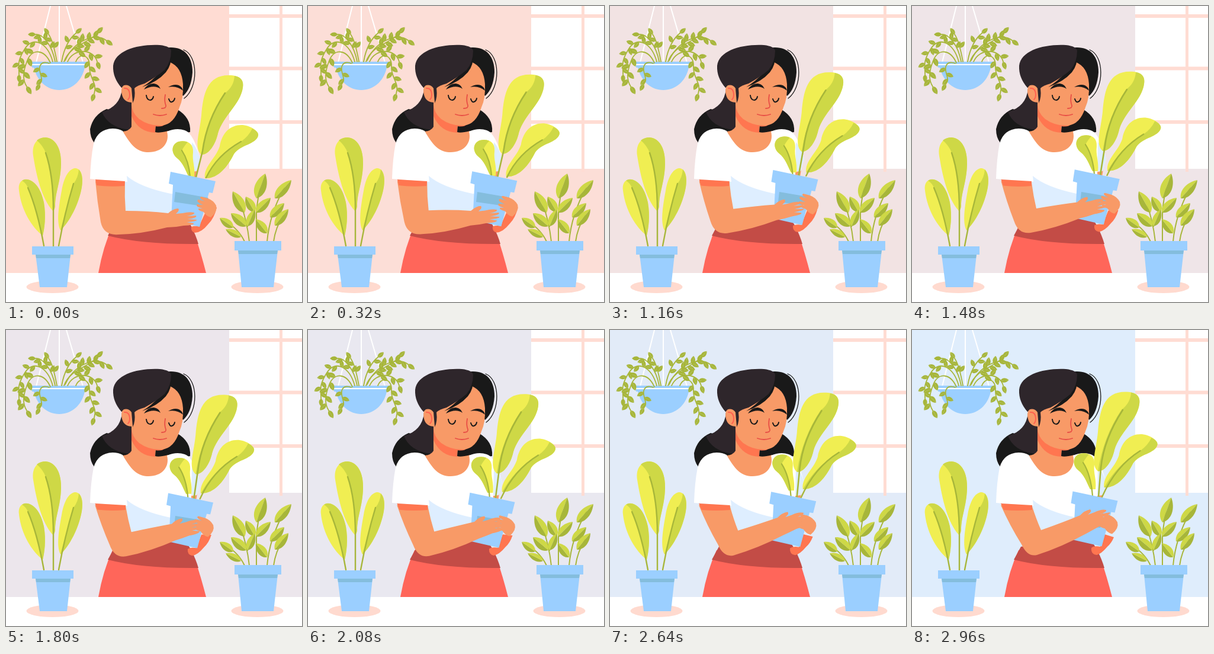
Recreate the animation shown at these times as an HTML page. Size 500 by 500 pixels, loop 3000 ms.

```html
<!DOCTYPE html>
<html lang="en">
<head>
<meta charset="utf-8">
<title>Woman with plants</title>
<style>
html, body { margin: 0; width: 100%; height: 100%; overflow: hidden; background: #fff; }
svg { display: block; width: 100vw; height: 100vh; }
.line { fill: none; stroke-linecap: round; stroke-linejoin: round; }
</style>
</head>
<body>
<svg id="stage" viewBox="0 0 500 500">
  <rect id="wall" width="500" height="451"/>
  <path fill="#fff" d="M377 0H500V275H377ZM0 451H500V500H0Z"/>
  <path fill="#ffdcd3" d="M377 14H500V20H377ZM377 102.500H500V108.500H377ZM377 193H500V199H377ZM462 0H467V280H462Z"/>

  <path class="line" stroke="#fff" stroke-width="2" d="M75 0L51 95M90 0V95M102 0L130 95"/>
  <path fill="#9bcfff" d="M42 94H138L135 104H133C128 128 110 142 90 142S53 128 47 104H44Z"/>
  <path stroke="#fff" stroke-width="2" d="M43 99H137"/>
  <g id="vines"></g>

  <g fill="#ffdacf"><ellipse cx="78.500" cy="474.500" rx="44" ry="10.500"/><ellipse cx="424.500" cy="474.500" rx="44" ry="10.500"/></g>
  <g id="tall"></g>
  <g id="bush"></g>
  <g fill="#9bcfff">
    <path d="M44 406H114V420H109L103 475H57L50 420H44Z"/>
    <path d="M386 397H465V413H459L452 475H398L392 413H386Z"/>
  </g>
  <path fill="#84bddd" d="M50 420H109L108 426H51ZM392 413H459L458 419H393Z"/>

  <!-- back hair and neck -->
  <path fill="#191919" d="M170 174Q147 184 142 208Q142 222 149 231L165 212L212 214L212 185ZM288 174Q313 188 311 213L285 216L245 214L252 190Z"/>
  <path fill="#2e262b" d="M196 140Q193 170 162 179Q172 204 206 209L216 206L214 160Z"/>
  <path fill="#f89a67" d="M212 165V204Q208 211 197 212Q212 249 240 248Q276 248 274 211Q258 215 252 213L254 190Z"/>
  <path fill="#ff7650" d="M212 168Q230 195 268 200Q264 205 252 203V214Q224 213 212 186Z"/>

  <!-- shirt, trousers -->
  <path fill="#f89a67" d="M313 276H323L320 295H312Z"/>
  <path fill="#fff" d="M197 211C213 240 225 247 241 247C263 247 277 232 272 212Q288 205 302 210Q317 215 328 258L322 279L313 280L312 372H186L192 296L142 292Q143 258 148 232Q155 208 180 207Q190 207 197 211Z"/>
  <path fill="#deeeff" d="M204 287Q226 306 278 317L314 320V372H190L196 297L205 297ZM314 230Q323 240 328 258L322 279H313Z"/>
  <path fill="#ff665a" d="M180 372Q164 406 156 451H338Q329 416 320 390L306 368Z"/>
  <path fill="#c34c46" d="M184 366L300 350L313 372Q321 388 325 402Q230 403 172 388Z"/>

  <!-- head -->
  <path fill="#191919" d="M268 71C298 66 315 82 315 112Q313 140 299 152L280 120Z"/>
  <path class="line" stroke="#191919" stroke-width="1.300" d="M300 74C325 84 325 138 301 156"/>
  <path fill="#f89a67" d="M212 140Q214 125 235 110L277 95Q297 103 299 132Q300 156 293 171Q284 200 263 202Q242 203 225 191Q212 180 212 165Z"/>
  <path fill="#191919" d="M230 137Q264 116 278 82Q281 98 270 112Q256 128 230 137Z"/>
  <path fill="#2e262b" d="M195 138Q180 121 181 101C184 75 223 64 260 66Q278 68 279 76Q279 94 268 108Q254 120 234 131Q222 134 217 139Q219 155 214 164Q211 152 211 138Z"/>
  <path fill="#f89a67" d="M212 139Q207 132 199 134Q193 138 196 150Q199 163 214 163Z"/>
  <path class="line" stroke="#ff6150" stroke-width="2" d="M200 139Q208 138 209 149Q209 156 206 158"/>
  <path fill="#191919" d="M233 141Q240 130 250 131Q258 132 261 140Q250 132 233 141ZM274 137Q284 131 292 134Q298 137 299 143Q288 134 274 137Z"/>
  <path class="line" stroke="#191919" stroke-width="2" d="M237 151Q238 159 244 159Q248 158 249 153M275 157Q277 163 280 162Q284 161 285 156"/>
  <path class="line" stroke="#e84e45" stroke-width="1.800" d="M269 150Q267 160 270 168Q271 173 263 173M249 183Q260 187 271 183"/>

  <g id="held"></g>
</svg>
<script>
const $ = id => document.getElementById(id);
const YELLOW = '#f0ee52', LIME = '#ced846', OLIVE = '#a7b63a', SKIN = '#f89a67', BLUSH = '#ff7650', BLUE = '#9bcfff';
const fill = (d, color) => `<path d="${d}" fill="${color}"/>`;
const line = (d, color, width) => `<path class="line" d="${d}" stroke="${color}" stroke-width="${width}"/>`;

// A pointed leaf from base to tip, one colour per half
function leaf(x, y, tx, ty, width, one, two = one) {
  const dx = tx - x, dy = ty - y, len = Math.hypot(dx, dy);
  const half = (side, color) => {
    const nx = -dy / len * width * side, ny = dx / len * width * side;
    return fill(`M${x} ${y}C${x + dx * .2 + nx} ${y + dy * .2 + ny} ${x + dx * .65 + nx} ${y + dy * .65 + ny} ${tx} ${ty}Z`, color);
  };
  return half(-1, one) + half(1, two);
}

// Hanging vines: stem, leaf count, leaf length
const vines = [
  ['M86 94C82 72 78 56 72 48', 3, 13],
  ['M83 94C78 66 62 47 50 48', 5, 13],
  ['M79 94C70 62 46 50 32 72S22 100 22 116', 9, 13],
  ['M75 96C64 72 44 72 36 92S28 125 35 136', 6, 15],
  ['M73 97C60 92 54 100 58 114S60 126 57 132', 4, 13],
  ['M94 94C98 70 108 54 118 46', 4, 13],
  ['M98 94C108 66 138 64 154 46', 6, 14],
  ['M100 92C115 58 152 44 169 58', 6, 14],
  ['M104 94C115 70 148 72 154 94', 5, 14],
  ['M118 94C124 78 142 82 141 102S155 130 149 148', 7, 14]
];

function vine([d, count, size]) {
  const path = document.createElementNS('http://www.w3.org/2000/svg', 'path');
  path.setAttribute('d', d);
  const total = path.getTotalLength();
  let out = line(d, OLIVE, 1.8);
  for (let i = 1; i <= count; i++) {
    const at = total * (.25 + .75 * i / count);
    const a = path.getPointAtLength(at - 2), b = path.getPointAtLength(at);
    const turn = i === count ? 0 : i % 2 ? .9 : -.9;
    const angle = Math.atan2(b.y - a.y, b.x - a.x) + turn;
    out += leaf(b.x, b.y, b.x + size * Math.cos(angle), b.y + size * Math.sin(angle), size * .36, OLIVE);
  }
  return out;
}
$('vines').innerHTML = vines.map(vine).join('');

$('tall').innerHTML =
  fill('M79 346C60 325 51 285 46 253C43 232 54 222 67 222C84 223 94 242 93 268C92 298 83 315 83 338Q82 345 79 346Z', YELLOW) +
  fill('M52 227Q58 222 67 222C84 223 94 242 93 268C92 298 83 315 83 338Q82 345 79 346Q80 286 67 248Q62 235 52 227Z', LIME) +
  line('M67 248Q80 286 80 345V406', OLIVE, 2.4) +
  fill('M62 388C43 373 26 345 22 312C20 299 26 292 36 293C50 295 60 312 64 332C68 355 65 376 62 388Z', YELLOW) +
  fill('M27 295Q31 292 36 293C50 295 60 312 64 332C68 355 65 376 62 388Q53 344 37 307Q34 299 27 295Z', LIME) +
  line('M37 307Q53 344 64 405', OLIVE, 2.4) +
  fill('M92 379C85 365 89 339 94 312C98 289 106 275 117 274C128 275 131 289 128 306C123 335 107 365 92 379Z', YELLOW) +
  fill('M123 276Q131 285 128 306C123 335 107 365 92 379C99 350 108 328 114 300Q122 290 123 276Z', LIME) +
  line('M114 300Q99 350 89 405', OLIVE, 2.4);

const bushLeaves = [
  [423, 325, 438, 283, 13], [422, 349, 447, 324, 10], [441, 384, 422, 360, 10],
  [420, 348, 405, 322, 10], [408, 372, 420, 344, 9], [403, 349, 383, 313, 12],
  [406, 372, 380, 350, 11], [384, 374, 361, 358, 9], [397, 390, 371, 377, 8],
  [454, 325, 482, 294, 11], [446, 357, 470, 333, 10], [454, 371, 477, 343, 10]
];
$('bush').innerHTML =
  line('M423 398V345L430 296M411 398Q407 362 396 333M408 372L392 358M403 398Q394 378 372 364M441 398Q445 352 470 307M452 398Q455 375 468 354', OLIVE, 2) +
  bushLeaves.map(l => l[2] > l[0] ? leaf(...l, LIME, OLIVE) : leaf(...l, OLIVE, LIME)).join('');

// Moving parts: start path, end path, colour, stroke width
const moving = [];
const held = (from, to, color, width) => moving.push({ from, to, color, width });
const NUMBER = /-?\d+(\.\d+)?/g;
function shift(d, dx, dy) {
  let i = 0;
  return d.replace(NUMBER, n => +n + (i++ % 2 ? dy : dx));
}
const slide = (d, dx, dy, color, width) => held(d, shift(d, dx, dy), color, width);

// Small leaf
slide('M309 289C302 275 299 265 289 257C278 248 279 233 292 229C306 226 317 232 316 247C314 262 320 272 318 289Z', -8, -20, YELLOW);
slide('M309 289C302 275 299 265 289 257C278 248 279 233 292 229Q300 227 307 230Q302 235 297 244Q309 262 311 289Z', -8, -20, LIME);
held('M297 244Q309 262 311 289', 'M289 224Q302 244 305 280', OLIVE, 2.2);
// Right leaf
slide('M336 291C333 272 354 258 361 237C365 213 380 200 400 201C416 203 427 212 426 219C422 234 396 234 385 250C374 272 358 292 336 291Z', -11.5, -25, YELLOW);
slide('M416 207C424 211 427 215 426 219C422 234 396 234 385 250C374 272 358 292 336 291Q358 252 397 229Q410 220 416 207Z', -11.5, -25, LIME);
held('M397 229Q356 252 338 290', 'M385.5 204Q344 230 321 282', OLIVE, 2.4);
// Large leaf
slide('M330 251C317 240 327 215 330 185C333 148 340 117 376 117C396 117 402 125 400 138C396 166 367 185 358 215C354 234 342 252 330 251Z', -16, -12.5, YELLOW);
slide('M386 118C398 120 402 128 400 138C396 166 367 185 358 215C354 234 342 252 330 251Q339 193 370 147Q385 136 386 118Z', -16, -12.5, LIME);
held('M370 147Q339 193 332 245L321 289', 'M356 135Q324 184 319 233L315 282', OLIVE, 2.6);

// Far forearm
held('M313 373Q318 371 326 372L338 346L356 340Q352 358 342 368Q330 383 319 383Q312 381 313 373Z',
     'M303 368Q308 364 318 366L325 345L341 350Q337 360 330 366Q320 378 312 380Q302 379 303 368Z', BLUSH);
// Pot
slide('M278 280L354 296L349 316L343 315L327 373L279 362L282 302L275 300Z', -6.5, -7.5, BLUE);
held('M286 314L342 324L331 338L284 331Z', 'M286 314L326 320L318 334L284 331Z', '#84bddd');
// Near arm and hand
held('M151 296L201 298Q200 322 202 346Q240 346 274 350Q283 342 291 342Q294 345 287 351L298 350Q310 347 318 349Q320 352 305 355L321 354Q324 358 306 360L322 361Q323 364 305 365L317 367Q319 370 300 371Q286 374 272 374Q230 385 190 386Q165 388 160 365Q154 330 151 296Z',
     'M150 296L203 298Q210 320 218 338Q255 325 284 313Q291 305 301 303Q305 306 297 312L308 308Q320 302 328 304Q330 307 318 311L334 308Q337 311 319 317L336 314Q338 317 320 322L333 322Q335 326 316 332Q305 338 296 343Q252 367 211 380Q195 384 185 362Q165 330 150 296Z', SKIN);
held('M151 293L201 296L200 304Q174 306 153 303Z', 'M150 293L203 296L203 304Q178 306 155 304Z', BLUSH);
// Far hand
slide('M346 357Q358 347 355 337Q350 328 341 325L330 322Q324 324 336 330L325 327Q319 330 333 336L323 335Q319 339 332 342L325 342Q323 345 334 348Q338 355 346 357Z', -8, -12.5, SKIN);

$('held').innerHTML = moving.map(m => m.width ? line(m.from, m.color, m.width) : fill(m.from, m.color)).join('');
moving.forEach((m, i) => {
  m.node = $('held').children[i];
  m.ends = m.to.match(NUMBER);
});

const LOOP = 3000, STEP = 40, LAST = LOOP / STEP - 1;
const warm = [255, 220, 211], cool = [223, 237, 252];
const mix = (a, b, p) => a + (b - a) * p;

function draw(ms) {
  const p = Math.floor(ms % LOOP / STEP) / LAST;
  $('wall').setAttribute('fill', `rgb(${warm.map((c, i) => Math.round(mix(c, cool[i], p)))})`);
  for (const m of moving) {
    let i = 0;
    m.node.setAttribute('d', m.from.replace(NUMBER, n => mix(+n, +m.ends[i++], p).toFixed(2)));
  }
}

const start = performance.now();
function tick() {
  draw(performance.now() - start);
  requestAnimationFrame(tick);
}
tick();
</script>
</body>
</html>
```
